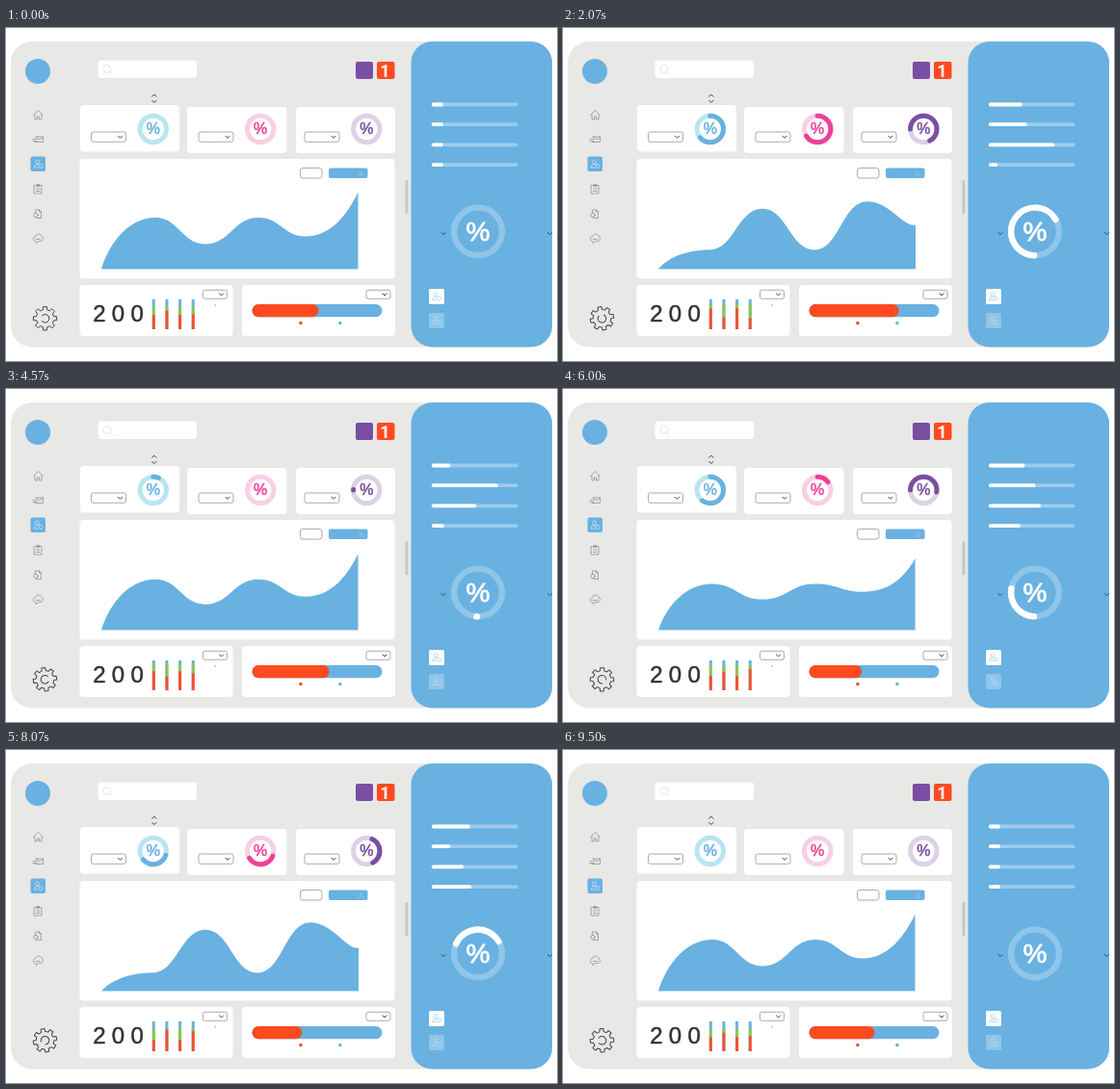
An HTML page for the animation above (9570 ms loop, 572 by 346 pixels).

```html
<!DOCTYPE html>
<html lang="en">
<head>
<meta charset="utf-8">
<title>Dashboard</title>
<style>
html, body { margin: 0; width: 100%; height: 100%; overflow: hidden; background: #fff; }
svg { display: block; width: 572px; height: 346px; }
text { font-family: "Liberation Sans", Arial, sans-serif; }
.pct { text-anchor: middle; }
.line { fill: none; stroke: #777; stroke-width: .6; stroke-linecap: round; stroke-linejoin: round; }
#gear { stroke: #444; stroke-width: 1; }
.chev { fill: none; stroke: #444; stroke-width: 1; }
.box { fill: #fff; stroke: #888; stroke-width: .7; }
.ring { fill: none; stroke-linecap: round; }
</style>
</head>
<body>
<svg viewBox="0 0 572 346">
  <defs>
    <path id="down" class="chev" d="M-2.4-1.2 0 1.2 2.4-1.2"/>
    <g id="user" fill="none" stroke-width=".65">
      <circle cx="-1" cy="-2.5" r="2"/>
      <path d="M-4.5 3.5Q-4 0-1 0T1 1M-4.5 3.5H0"/>
      <circle cx="2.5" cy="2" r="2"/>
    </g>
  </defs>

  <rect x="5" y="14" width="562" height="317.5" rx="22" fill="#e8e8e6"/>
  <rect x="420.5" y="14" width="146.5" height="317.5" rx="22" fill="#69b1e1"/>
  <circle cx="33" cy="45" r="13" fill="#69b1e1"/>

  <g fill="#fff">
    <rect x="95.5" y="33.5" width="102.5" height="18.5" rx="3"/>
    <rect x="77" y="80" width="103" height="48.5" rx="4"/>
    <rect x="188" y="82" width="103.5" height="48" rx="4"/>
    <rect x="301" y="82" width="103" height="48" rx="4"/>
    <rect x="76.5" y="136" width="327" height="124.5" rx="4"/>
    <rect x="76.5" y="267" width="159" height="53" rx="4"/>
    <rect x="245" y="267" width="159" height="53" rx="4"/>
  </g>
  <g fill="none" stroke="#ddd" stroke-width=".7">
    <circle cx="105" cy="42.5" r="4"/><path d="M108 45.5l3 3"/>
  </g>
  <rect x="363" y="35" width="18" height="18" rx="2" fill="#7a4fa3"/>
  <rect x="385" y="35" width="18.5" height="18" rx="2" fill="#ff4a20"/>
  <text x="393.5" y="50.5" font-size="18" font-weight="bold" fill="#fff" text-anchor="middle" style="font-family:Roboto,sans-serif">1</text>
  <rect x="414.5" y="158" width="2.8" height="35.5" rx="1.4" fill="#c6c6c6"/>
  <path class="chev" d="M151.3 71.5 153.8 69l2.500 2.500M151.300 75l2.500 2.500 2.500-2.500"/>

  <g class="line">
    <path d="M28.5 90.5 33.5 85.5l5 5M30 90v5h2.500v-3h2v3H37v-5"/>
    <path d="M31 113h7.500v5.500H30M31 113l4 3 3.500-3M28 115.500h4M28 117.500h4"/>
    <path d="M29.500 163.500h7.500v8.500h-7.500zM32 162.500h2.500v2H32M31.500 167h3.500M31.500 169.500h3.500"/>
    <path d="M30.500 192v-3h4l2 2v6.500h-5M34.500 189v2h2"/><circle cx="31" cy="194.500" r="2.200"/>
    <path d="M31 222c-4-1-3-5-.500-5.500 2-4 7-2 6.500 0 2.500 1 1.500 5-1 5h-2.500l-2 2z"/>
    <path d="M31.500 219.500h4"/>
  </g>
  <rect x="25.500" y="133.500" width="15.500" height="15.500" rx="2" fill="#69b1e1"/>
  <use href="#user" x="33.500" y="141.500" stroke="#d5e9f7"/>
  <g id="gear" class="line"></g>

  <g id="selects"></g>
  <rect class="box" x="305.500" y="145.500" width="22.500" height="10.500" rx="2.500"/>
  <rect x="335" y="145.500" width="40.500" height="10.500" rx="2" fill="#69b1e1"/>
  <use href="#user" transform="translate(368.500 151.500) scale(.6)" stroke="#a5cfec"/>
  <path id="chart" fill="#69b1e1"/>

  <text x="90.200" y="305" font-size="24" letter-spacing="6.300" fill="#333" stroke="#333" stroke-width=".5">200</text>
  <g id="columns" stroke-width="3"></g>
  <path d="M216.500 287.500l1.500 1" stroke="#777" stroke-width=".8"/>
  <rect x="255.500" y="287" width="135" height="13.300" rx="6.600" fill="#69b1e1"/>
  <rect id="progress" x="255.500" y="287" height="13.300" rx="6.600" fill="#ff4a20"/>
  <rect x="304.300" y="305" width="3.200" height="3.200" rx="1" fill="#ff4a20"/>
  <rect x="345.300" y="305" width="3.200" height="3.200" rx="1" fill="#69b1e1"/>

  <g id="meters" stroke-width="3.800" stroke-linecap="round"></g>
  <g id="rings"></g>
  <use href="#down" x="454" y="213.500"/>
  <use href="#down" x="564.500" y="213.500"/>
  <rect x="439" y="271" width="16" height="16" rx="1.500" fill="#fff"/>
  <use href="#user" x="447" y="279" stroke="#9bcbec"/>
  <rect x="439" y="296" width="16" height="16" rx="1.500" fill="#8fc5e9"/>
  <use href="#user" x="447" y="304" stroke="#b9dcf3"/>
</svg>
<script>
const LOOP = 9.57, FPS = 14;
const $ = id => document.getElementById(id);

function add(parent, tag, attrs, text) {
  const el = document.createElementNS('http://www.w3.org/2000/svg', tag);
  set(el, attrs);
  if (text) el.textContent = text;
  return parent.appendChild(el);
}
function set(el, attrs) {
  for (const k in attrs) el.setAttribute(k, attrs[k]);
}

const mix = (a, b, u) => a + (b - a) * u;
const ramp = (t, from, to) => Math.min(1, Math.max(0, (t - from) / (to - from)));
const ease = (t, from, to) => (1 - Math.cos(Math.PI * ramp(t, from, to))) / 2;
const tent = (t, from, peak, to) => Math.min(ramp(t, from, peak), 1 - ramp(t, peak, to));
const wave = (t, peak) => Math.cos(2 * Math.PI * (t - peak) / LOOP);

function select(x, y, w, h) {
  add($('selects'), 'rect', { class: 'box', x, y, width: w, height: h, rx: 2 });
  add($('selects'), 'use', { href: '#down', x: x + w - 6, y: y + h / 2 });
}
for (const x of [88.5, 200, 310]) select(x, 108, 36, 10.3);
for (const x of [204.5, 374]) select(x, 272.3, 25, 9);

// Gear: eight teeth around an open circle
const polar = (r, deg) => {
  const a = deg * Math.PI / 180;
  return `${(r * Math.cos(a)).toFixed(2)} ${(r * Math.sin(a)).toFixed(2)}`;
};
let teeth = [];
for (let a = 0; a < 360; a += 45)
  teeth.push(polar(9.3, a - 13), polar(12.3, a - 9), polar(12.3, a + 9), polar(9.3, a + 13));
add($('gear'), 'path', { d: `M${teeth.join('L')}Z` });
add($('gear'), 'path', { d: `M${polar(4.3, 40)}A4.3 4.3 0 1 1 ${polar(4.3, -40)}` });

// Each ring opens twice; the first close rewinds or chases its own head
const small = { y: 105, r: 13.7, w: 5, size: 16 };
const rings = [
  { ...small, x: 152.8, track: '#b8e6f0', color: '#69b1e1', from: 0, span: 230, sleep: 2.1, wake: 4.1 },
  { ...small, x: 264.2, track: '#f9cfe3', color: '#ec4199', from: 0, span: 238, sleep: 2.9, wake: 5.3, rewind: true },
  { ...small, x: 374.3, track: '#dcd2e6', color: '#7a4fa3', from: 270, span: 242, sleep: 2.1, wake: 4.45 },
  { x: 490, y: 211.5, r: 24.9, w: 6.4, size: 28, track: '#8fc5e9', color: '#fff',
    from: 182, span: 238, sleep: 3.15, wake: 5, rewind: true }
];
for (const g of rings) {
  const base = { class: 'ring', cx: g.x, cy: g.y, r: g.r, 'stroke-width': g.w };
  add($('rings'), 'circle', { ...base, stroke: g.track });
  g.arc = add($('rings'), 'circle', { ...base, stroke: g.color, pathLength: 360 });
  add($('rings'), 'text', { class: 'pct', x: g.x, y: g.y + g.size * .34, 'font-size': g.size,
    fill: g.color, stroke: g.color, 'stroke-width': g.size / 32 }, '%');
}

function drawRing(g, t) {
  const first = t < g.wake;
  const open = first ? ease(t, .2, 2) : ease(t, g.wake, g.wake + 2.25);
  const shut = first ? ease(t, g.sleep, g.sleep + 1.5) : ease(t, 7.35, 8.85);
  const back = first && g.rewind;
  const a = back ? 0 : shut * g.span;
  const len = g.span * (back ? open - shut : open - shut * open);
  set(g.arc, {
    visibility: len > .5 ? 'visible' : 'hidden',
    'stroke-dasharray': `${len} 360`,
    transform: `rotate(${g.from + a - 90} ${g.x} ${g.y})`
  });
}

// Meters: an early and a late swell, each with a peak time and height
const meters = [
  { y: 79.5, early: [2.1, 5.5, 23], late: [7.2, 46] },
  { y: 100.2, early: [4.4, 8.6, 59], late: [7, 0] },
  { y: 121.3, early: [2.1, 8, 57], late: [7, 38] },
  { y: 142.1, early: [2, 4, -3], late: [7.5, 42] }
];
for (const m of meters) {
  add($('meters'), 'path', { d: `M443.8 ${m.y}H529.7`, stroke: '#9bcbec' });
  m.bar = add($('meters'), 'path', { stroke: '#fff' });
}

// Column levels sway once per loop, each peaking at its own time
const columns = [7.8, 3, 7.7, 2].map((peak, i) => {
  const x = 153.3 + i * 13.65;
  add($('columns'), 'path', { d: `M${x} 282V313`, stroke: '#69b1e1' });
  return { x, peak, green: add($('columns'), 'path', { stroke: '#8cc84b' }),
                    red: add($('columns'), 'path', { stroke: '#f4512c' }) };
});

// Two outlines: turning points from left to right, and the slope of the last handle
const hills = { x: [99, 155, 207, 262, 311, 365.5], y: [250.5, 197, 224.5, 197, 216.5, 170.5], tail: 25 };
const waves = { x: [99, 152, 207, 261, 316, 366], y: [250.5, 231.5, 186.8, 231.5, 179.2, 205.5], tail: 3 };

function outline(u) {
  const x = hills.x.map((v, i) => mix(v, waves.x[i], u));
  const y = hills.y.map((v, i) => mix(v, waves.y[i], u));
  const last = x.length - 1;
  let d = `M${x[0]} ${y[0]}`;
  for (let i = 1; i <= last; i++) {
    const reach = (x[i] - x[i - 1]) * .47;
    const out = i === 1 ? [x[0] + 9, mix(y[0], y[1], .55)] : [x[i - 1] + reach, y[i - 1]];
    const into = i === last ? [x[i] - 12, y[i] + mix(hills.tail, waves.tail, u)] : [x[i] - reach, y[i]];
    d += `C${[...out, ...into, x[i], y[i]].map(v => v.toFixed(2)).join(' ')}`;
  }
  return d + `V${y[0]}Z`;
}

function draw(t) {
  const half = t % (LOOP / 2);
  set($('chart'), { d: outline(ease(half, .865, 2.215) - ease(half, 3.35, 4.7)) });

  rings.forEach(g => drawRing(g, t));

  for (const { y, early: [p, end, h], late: [q, k], bar } of meters) {
    const x = 452.1 + h * tent(t, 0, p, end) + k * tent(t, 4.5, q, 9.4);
    set(bar, { d: `M443.8 ${y}H${x}` });
  }

  const top = 287.8 + 2 * wave(t, 9);
  for (const c of columns) {
    const level = 296 + 5.5 * wave(t, c.peak);
    set(c.green, { d: `M${c.x} ${top}V${level}` });
    set(c.red, { d: `M${c.x} ${level}V313` });
  }

  const s = t > 7 ? t - LOOP : t;
  set($('progress'), { width: 47.5 + 49 * (ease(s, 7 - LOOP, 3) - ease(s, 3, 7)) });
  set($('gear'), { transform: `translate(40.5 301.8) rotate(${180 + t * 360 / LOOP})` });
}

const start = performance.now();
function tick() {
  const t = (performance.now() - start) / 1000 % LOOP;
  draw(Math.floor((t + .005) * FPS) / FPS);
  requestAnimationFrame(tick);
}
tick();
</script>
</body>
</html>
```
